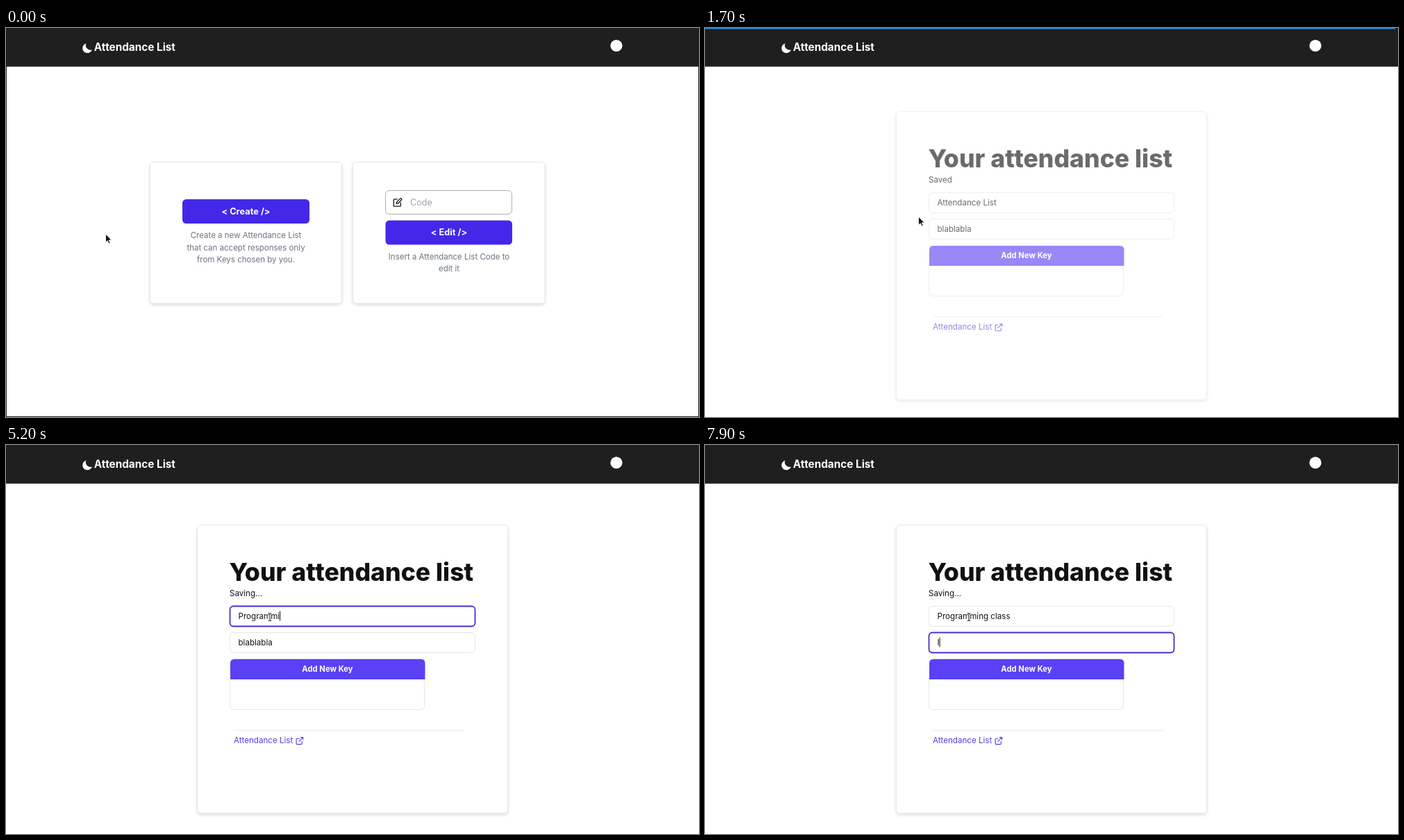
Write an HTML page that moves like this. It is 998 px wide and 561 px high and loops after 8 s.

```html
<!DOCTYPE html>
<html lang="en">
<head>
<meta charset="utf-8">
<title>Attendance List</title>
<style>
  html, body { margin: 0; width: 100%; height: 100%; overflow: hidden; background: #fff; }
  svg { display: block; width: 998px; height: 561px; }
  text { font: 400 11.6px Inter, Roboto, sans-serif; font-optical-sizing: none; white-space: pre; fill: #111; }
  .mid { text-anchor: middle; }
  .brand { font-size: 15.3px; font-weight: 700; fill: #fff; }
  .button { font-size: 12.8px; font-weight: 700; fill: #fff; }
  .add { font-size: 11.25px; font-weight: 700; fill: #fff; }
  .note { font-size: 11.5px; fill: #6b7280; }
  .hint { font-size: 12.6px; fill: #9ca3af; }
  .title { font-size: 35.6px; font-weight: 800; }
  .link { fill: #563ade; }
  .card { fill: #fff; stroke: #e7e8eb; filter: drop-shadow(0 2px 2px rgba(0, 0, 0, .14)); }
  .line { fill: none; stroke: #e5e7eb; }
  .icon { fill: none; stroke: #111; stroke-width: 1.3; stroke-linecap: round; stroke-linejoin: round; }
  .field { fill: #fff; stroke: #e5e7eb; }
  .field.focus { stroke: #4a2dcc; stroke-width: 1.8; }
  .mark { fill: #3390ff; }
  .caret { fill: #111; }
  .pointer { stroke-linejoin: round; }
</style>
</head>
<body>
<svg viewBox="0 0 998 561">
  <rect width="998" height="561" fill="#fff"/>

  <g id="home">
    <rect x=".5" y="40.5" width="997" height="520" fill="none" stroke="#222"/>
    <rect class="card" x="207.5" y="193.5" width="276" height="203.5" rx="5"/>
    <rect class="card" x="499.5" y="193.5" width="276.5" height="203.5" rx="5"/>

    <rect id="create" x="254" y="247" width="183" height="35" rx="5.5"/>
    <text class="button mid" x="345.5" y="268.8">&lt; Create /&gt;</text>
    <text class="note mid" x="345.5" y="303.2">Create a new Attendance List</text>
    <text class="note mid" x="345.5" y="320.8">that can accept responses only</text>
    <text class="note mid" x="345.5" y="338.4">from Keys chosen by you.</text>

    <rect x="546.5" y="234.5" width="182" height="34" rx="5.5" fill="#fff" stroke="#a8adb6"/>
    <path class="icon" d="M563.5 246.8H559.5Q558.3 246.8 558.3 248V256Q558.3 257.2 559.5 257.2H567.2Q568.4 257.2 568.4 256V252M562.2 253.4L562.8 250.9 567.6 246.1Q568.6 245.4 569.5 246.2 570.2 247.1 569.5 248L564.7 252.8Z"/>
    <text class="hint" x="582" y="255.8">Code</text>
    <rect x="546.5" y="277.5" width="182.5" height="35" rx="5.5" fill="#4428ea"/>
    <text class="button mid" x="638" y="299.4">&lt; Edit /&gt;</text>
    <text class="note mid" x="638" y="333.8">Insert a Attendance List Code to</text>
    <text class="note mid" x="638" y="351.4">edit it</text>
  </g>

  <g id="editor">
    <rect class="card" x="275.5" y="115.5" width="447" height="415.5" rx="5"/>
    <text class="title" x="321.5" y="196.3">Your attendance list</text>
    <text id="status" x="322" y="218.4"></text>

    <g id="name"></g>
    <g id="about"></g>

    <path class="line" d="M322.5 338V375.5Q322.5 381.5 328.5 381.5H596.5Q602.5 381.5 602.5 375.5V338"/>
    <path d="M323 338V314.8Q323 308.8 329 308.8H597.5Q603.5 308.8 603.5 314.8V338Z" fill="#5a41f5"/>
    <text class="add mid" x="463" y="327.4">Add New Key</text>

    <path class="line" d="M328 411.5H660" stroke-opacity=".8"/>
    <text class="link" x="328" y="430.4">Attendance List</text>
    <path class="icon" style="stroke:#563ade;stroke-width:1.1" d="M422 423.2H419.3Q418.1 423.2 418.1 424.4V430.4Q418.1 431.6 419.3 431.6H425.1Q426.3 431.6 426.3 430.4V427.6M424.3 421.6H427.7V425M427.5 421.8L421.9 427.4"/>
  </g>

  <rect width="998" height="55.7" fill="#1f1f1f"/>
  <path d="M115.5 22.3A7 7 0 1 0 123.9 31.2A6.6 6.6 0 0 1 115.5 22.3Z" fill="#fff"/>
  <text class="brand" x="126.7" y="33">Attendance List</text>
  <circle cx="879" cy="25.5" r="8.6" fill="#fff"/>
  <rect id="progress" height="1.5" fill="#2a8de0"/>

  <g id="pointer" class="pointer">
    <path id="arrow" d="M0 0V12.2L2.8 9.7 4.7 14 6.7 13.1 4.8 8.9H8.6Z" fill="#111" stroke="#fff" stroke-width=".9"/>
    <path id="hand" d="M-1.6 1Q-1.6-.3-.5-.3 .6-.3 .6 1V5L1.2 4.4Q2.6 4 3 5.3 4.6 4.6 5.2 6 7.6 5.6 7.6 7.8V10.6Q7.6 12.2 6.4 14.4H-.4Q-1.6 12.2-4 9.8-5.1 8.4-4 7.7-2.9 7.2-1.6 8.9Z" fill="#fff" stroke="#111" stroke-width="1.1"/>
    <g id="beam" fill="none">
      <path d="M-2.3-5.5H2.3M0-5.5V5.5M-2.3 5.5H2.3" stroke="#fff" stroke-width="2.6"/>
      <path d="M-2.3-5.5Q0-5.5 0-4.5 0-5.5 2.3-5.5M0-5V5M-2.3 5.5Q0 5.5 0 4.5 0 5.5 2.3 5.5" stroke="#222" stroke-width="1.1"/>
    </g>
  </g>
</svg>

<script>
const LOOP = 8000, STEP = 100;
const TYPED = "Programming class";
const KEY_TIMES = [3500, 3900, 4000, 4300, 4500, 4700, 4800, 5000, 5200,
  5300, 5500, 5700, 6000, 6300, 6500, 6700, 6900];
const $ = id => document.getElementById(id);
const clamp = v => Math.min(1, Math.max(0, v));
const part = (t, from, to) => clamp((t - from) / (to - from));
const ease = p => p * p * (3 - 2 * p);
const mix = (a, b, p) => a + (b - a) * p;
const show = (node, on) => node.style.display = on ? "" : "none";

function makeField(id, y) {
  const group = $(id);
  group.innerHTML = `<rect class="field" x="322.5" y="${y}" width="353" height="29" rx="5"/>
    <rect class="mark" x="334.5" y="${y + 7}" height="15"/>
    <text x="334.5" y="${y + 18.3}"></text>
    <rect class="caret" y="${y + 7}" width="1" height="14"/>`;
  const [box, mark, text, caret] = group.children;
  return (value, focus, selected) => {
    text.textContent = value;
    text.style.fill = selected ? "#fff" : "";
    box.classList.toggle("focus", focus);
    const width = value ? text.getComputedTextLength() : 0;
    mark.setAttribute("width", selected ? width : 0);
    caret.setAttribute("x", 334.5 + width);
    show(caret, focus && !selected);
  };
}
const setName = makeField("name", 232.5);
const setAbout = makeField("about", 270.5);

function drawPointer(t) {
  const toButton = ease(part(t, 500, 1200)), toField = ease(part(t, 2300, 2600));
  const x = mix(mix(143.5, 307.5, toButton), 380, toField);
  const y = mix(mix(297, 272, toButton), 248, toField);
  const hover = t < 1500 && x > 254 && y < 282;
  const beam = t >= 2000;
  $("pointer").setAttribute("transform", `translate(${x} ${y})`);
  show($("hand"), hover);
  show($("beam"), beam);
  show($("arrow"), !hover && !beam);
  $("create").setAttribute("fill", hover ? "#5271f6" : "#4428ea");
}

function drawEditor(t) {
  const shown = t < 1700 ? .62 * part(t, 1500, 1700) : mix(.62, 1, part(t, 1700, 1900));
  $("editor").setAttribute("opacity", shown);
  $("editor").setAttribute("transform", `translate(0 ${13.4 * (1 - shown)})`);
  const keys = KEY_TIMES.filter(k => k <= t).length;
  const onAbout = t >= 7100;
  $("status").textContent = keys ? "Saving..." : "Saved";
  setName(keys ? TYPED.slice(0, keys) : "Attendance List", t >= 2800 && !onAbout, t >= 2900 && !keys);
  setAbout(t >= 7900 ? "I" : "blablabla", onAbout, onAbout && t < 7900);
}

function drawProgress(t) {
  $("progress").setAttribute("width", t < 1500 ? 0 : mix(300, 994, part(t, 1500, 1700)));
  $("progress").setAttribute("opacity", 1 - part(t, 1700, 1950));
}

function draw(now) {
  const t = Math.floor(now % LOOP / STEP) * STEP;
  show($("home"), t < 1500);
  show($("editor"), t >= 1500);
  drawPointer(t);
  drawEditor(t);
  drawProgress(t);
}

const start = performance.now();
function tick() {
  draw(performance.now() - start);
  requestAnimationFrame(tick);
}
tick();
</script>
</body>
</html>
```
